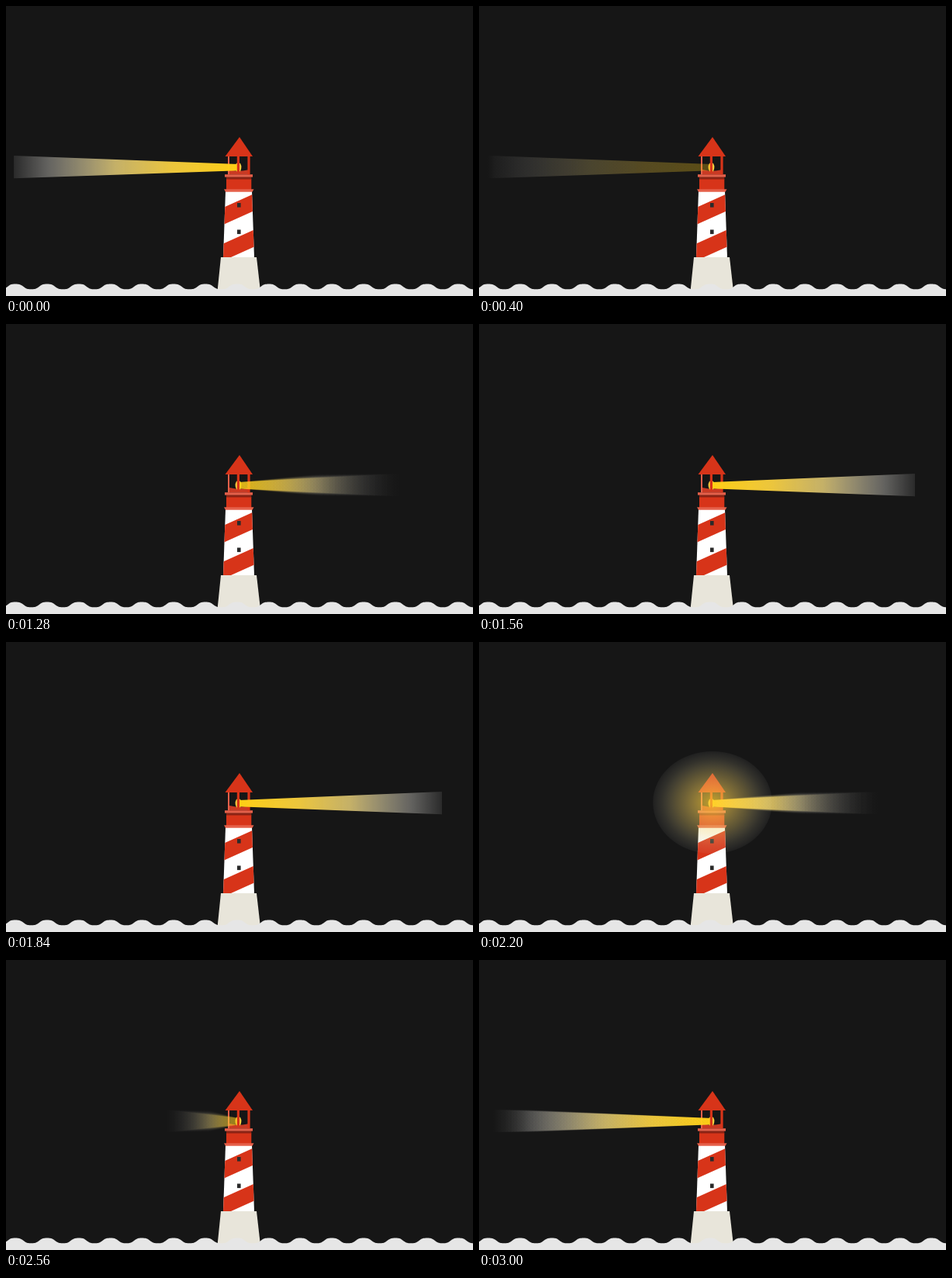
An HTML page with a canvas that plays this animation: 602x374 px, repeating every 3080 ms.

```html
<!DOCTYPE html>
<html lang="en">
<head>
<meta charset="utf-8">
<title>Lighthouse</title>
<style>
  html, body { margin: 0; width: 100%; height: 100%; overflow: hidden; background: #161616; }
  canvas { display: block; }
</style>
</head>
<body>
<canvas id="stage" width="602" height="374"></canvas>
<script>
const W = 602, H = 374, LOOP = 3080, STEP = 40;
const AWAY = 780, TOWARD = AWAY + LOOP / 2;   // when the lamp faces away from and toward us
const LAMP_X = 300;
const RED = '#d73419', PALE_RED = '#e5604a', DARK_RED = '#8c2314';

const ctx = document.getElementById('stage').getContext('2d');

function layer() {
  const c = document.createElement('canvas');
  c.width = W;
  c.height = H;
  return c.getContext('2d');
}

function poly(g, color, ...pts) {
  g.fillStyle = color;
  g.beginPath();
  for (let i = 0; i < pts.length; i += 2) g.lineTo(pts[i], pts[i + 1]);
  g.fill();
}

function rect(g, color, x0, y0, x1, y1) {
  g.fillStyle = color;
  g.fillRect(x0, y0, x1 - x0, y1 - y0);
}

function drawTower(g) {
  poly(g, '#e8e5da', 277, 324, 323, 324, 328, 368, 272.5, 368);
  g.save();
  g.beginPath();
  for (const [x, y] of [[283, 239], [317, 239], [320, 324], [280, 324]]) g.lineTo(x, y);
  g.clip();
  rect(g, '#fff', 278, 238, 322, 325);
  for (const y of [260, 306.5]) poly(g, RED, 280, y, 320, y - 18, 320, y + 4, 280, y + 22);
  g.restore();
  for (const y of [254, 288.5]) rect(g, '#2a2a2a', 298, y, 302.6, y + 5.6);
  rect(g, RED, 284, 223, 316.3, 237);
  rect(g, DARK_RED, 284, 220.5, 316.3, 223.5);
  poly(g, PALE_RED, 281, 236.3, 319.5, 236.3, 317.5, 239.8, 283, 239.8);
  rect(g, PALE_RED, 282, 217.2, 318, 220.6);
  poly(g, '#c93a24', 288, 211, 296, 212.5, 305, 212.5, 314, 211, 314, 217.2, 288, 217.2);
  rect(g, PALE_RED, 286, 193, 288, 217.3);
  rect(g, RED, 311.4, 193, 314.6, 217.3);
  poly(g, RED, 301, 169, 318, 194, 282.5, 194);
}

// Full crests and troughs with steep flanks.
function drawWaves(g) {
  g.fillStyle = '#e6e6e6';
  g.beginPath();
  g.moveTo(0, H);
  for (let x = 0; x <= W; x++) {
    const c = Math.cos((x - 12.2) / 40.8 * 2 * Math.PI);
    g.lineTo(x, 361.9 - 3.3 * c * (1.5 - 0.5 * c * c));
  }
  g.lineTo(W, H);
  g.fill();
}

const tower = layer(), waves = layer(), light = layer();
drawTower(tower);
drawWaves(waves);

function lightStops(grad, stops) {
  for (const [p, color] of stops) grad.addColorStop(p, `rgba(${color})`);
  return grad;
}

const beamStops = [[0, '255,207,20,1'], [0.3, '252,211,65,.93'], [0.55, '240,215,125,.8'],
  [0.85, '225,223,215,.38'], [1, '225,225,225,.1']];
const glowStops = [[0, '255,208,45,.74'], [0.3, '252,210,85,.52'], [0.6, '235,208,115,.32'],
  [0.85, '220,212,170,.14'], [1, '220,220,210,.05']];

// Each half turn swings out with a sine, then collapses sharply.
function beamAt(t) {
  const half = LOOP / 2, turn = (t - AWAY + LOOP) % LOOP;
  const toLeft = turn >= half;
  const v = turn % half / half * 2;
  const out = v < 1 ? Math.sin(v * Math.PI / 2) ** 1.5 : 1 - (v - 1) ** 10;
  let power = Math.min(1, 1.05 * Math.sqrt(v));
  if (toLeft && v >= 0.99) power = 0.6 * (2 - v);
  return {
    length: out * (toLeft ? -290 : 262),
    spread: Math.min(0.6, 1.1 * Math.sqrt(1 - out)),
    power
  };
}

// Overlaid lengths give the beam its soft end and flared edges.
function drawBeam({ length, spread, power }) {
  if (Math.abs(length) < 1) return;
  const n = spread > 0.03 ? 14 : 1;
  light.clearRect(0, 0, W, H);
  light.globalCompositeOperation = 'lighter';
  light.globalAlpha = 1 / n;
  for (let i = 0; i < n; i++) {
    const end = LAMP_X + length * (1 - spread * i / n);
    const fill = lightStops(light.createLinearGradient(LAMP_X, 0, end, 0), beamStops);
    poly(light, fill, LAMP_X, 204, end, 193, end, 222.3, LAMP_X, 212.2);
  }
  ctx.globalAlpha = power;
  ctx.drawImage(light.canvas, 0, 0);
  ctx.globalAlpha = 1;
}

function drawGlow(rx, ry, alpha) {
  if (rx < 1 || alpha <= 0) return;
  ctx.save();
  ctx.translate(301, 207);
  ctx.scale(rx, ry);
  ctx.globalAlpha = alpha;
  ctx.fillStyle = lightStops(ctx.createRadialGradient(0, 0, 0, 0, 0, 1), glowStops);
  ctx.beginPath();
  ctx.arc(0, 0, 1, 0, 2 * Math.PI);
  ctx.fill();
  ctx.restore();
}

function drawLamp() {
  ctx.fillStyle = '#f6cc3e';
  ctx.beginPath();
  ctx.ellipse(299.5, 208, 3.9, 6.2, 0, 0, 2 * Math.PI);
  ctx.fill();
}

function draw(t) {
  rect(ctx, '#161616', 0, 0, W, H);
  ctx.drawImage(tower.canvas, 0, 0);
  drawGlow(14, 13, 0.45 * (1 - Math.abs(t - AWAY) / 160));
  drawLamp();
  drawBeam(beamAt(t));
  rect(ctx, RED, 297.8, 193, 301, 215);
  const r = 240 - 1.36 * Math.abs(t - TOWARD);
  drawGlow(r, r * 0.86, 1);
  ctx.drawImage(waves.canvas, 0, 0);
}

const start = performance.now();
function tick() {
  const ms = (performance.now() - start) % LOOP;
  draw(Math.min(Math.floor(ms / STEP) * STEP, LOOP - 2 * STEP));   // the last pose holds twice as long
  requestAnimationFrame(tick);
}
tick();
</script>
</body>
</html>
```
